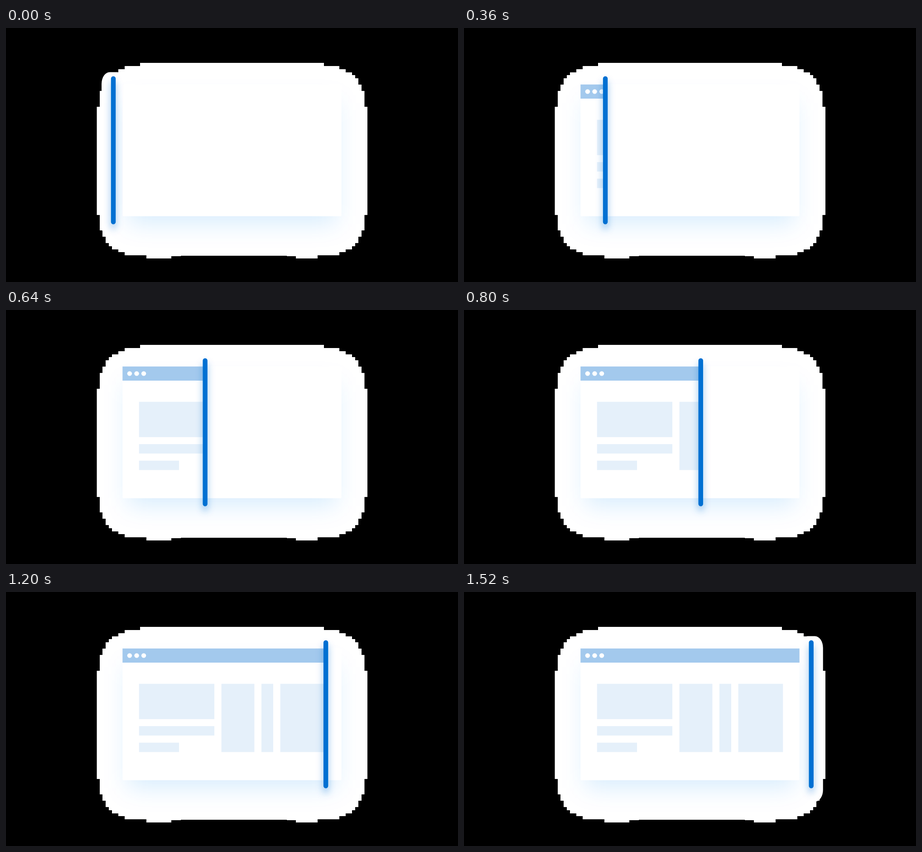
An HTML page for the animation above (1.96 s loop, 998 by 561 pixels).

```html
<!DOCTYPE html>
<html lang="en">
<head>
<meta charset="utf-8">
<title>Page reveal</title>
<style>
  html, body { margin: 0; width: 100%; height: 100%; overflow: hidden; background: #000; }
  svg { display: block; }
</style>
</head>
<body>
<svg width="998" height="561" viewBox="0 0 998 561">
  <defs>
    <clipPath id="glow">
      <path d="M296 77H702V84H736V91H750V98H764V104H771V111H778V125H785V139H791.5V174H798V413H791.5V447H785V461H778V475H771V482H764V489H750V495H736V502H688V509H640V504H620V503H386V504H365V509H310V502H262V495H248V489H234V482H227V475H220V461H213V447H207V413H200.5V174H207V139H213V125H220V111H227V104H234V98H248V91H262V84H296Z"/>
      <rect id="halo" y="97.5" width="52" height="365.5" rx="18" ry="26"/>
    </clipPath>
    <clipPath id="reveal"><rect id="wipe" y="100" x="250" height="330"/></clipPath>
    <filter id="soft" x="-50%" y="-50%" width="200%" height="200%"><feGaussianBlur stdDeviation="26"/></filter>
    <filter id="barSoft" filterUnits="userSpaceOnUse" x="-50" y="60" width="110" height="440"><feGaussianBlur stdDeviation="7.8"/></filter>
  </defs>
  <g clip-path="url(#glow)">
    <rect width="998" height="561" fill="#fff"/>
    <rect x="269" y="165" width="460" height="267" fill="#0084f0" fill-opacity=".155" filter="url(#soft)"/>
    <rect x="257.3" y="124.7" width="483.4" height="291.1" rx="2" fill="#fff"/>
    <g clip-path="url(#reveal)">
      <!-- layout grid: 192 units across the stage -->
      <g transform="scale(5.198)">
        <path fill="#a3c9ed" d="M49.5 24h93v6h-93z"/>
        <g fill="#fff">
          <circle cx="52.5" cy="27" r="1"/><circle cx="55.5" cy="27" r="1"/><circle cx="58.5" cy="27" r="1"/>
        </g>
        <path fill="#e5f0fa" d="M56.5 39h32v15h-32zM56.5 57h32v4h-32zM56.5 64h17v4h-17zM91.5 39h14v29h-14zM108.5 39h5v29h-5zM116.5 39h19v29h-19z"/>
      </g>
    </g>
    <g id="bar">
      <rect x="-5.2" y="116.9" width="10.4" height="327" rx="5.2" fill="#0070d2" fill-opacity=".42" filter="url(#barSoft)"/>
      <rect x="-5.2" y="106.5" width="10.4" height="327" rx="5.2" fill="#0070d2"/>
    </g>
  </g>
</svg>
<script>
  const LOOP = 1960, SWEEP = 1520, STEP = 40;
  const START = 237, END = 766.7;
  const [bar, halo, wipe] = ['bar', 'halo', 'wipe'].map(id => document.getElementById(id));

  function draw(now) {
    const time = Math.floor((now % LOOP) / STEP) * STEP;
    const p = Math.min(time / SWEEP, 1);
    const x = START + (END - START) * p * p * (3 - 2 * p);
    bar.setAttribute('transform', `translate(${x})`);
    halo.setAttribute('x', x - 26);
    wipe.setAttribute('width', Math.max(0, x - 250));
  }

  const origin = performance.now();
  function tick() {
    draw(performance.now() - origin);
    requestAnimationFrame(tick);
  }
  tick();
</script>
</body>
</html>
```
